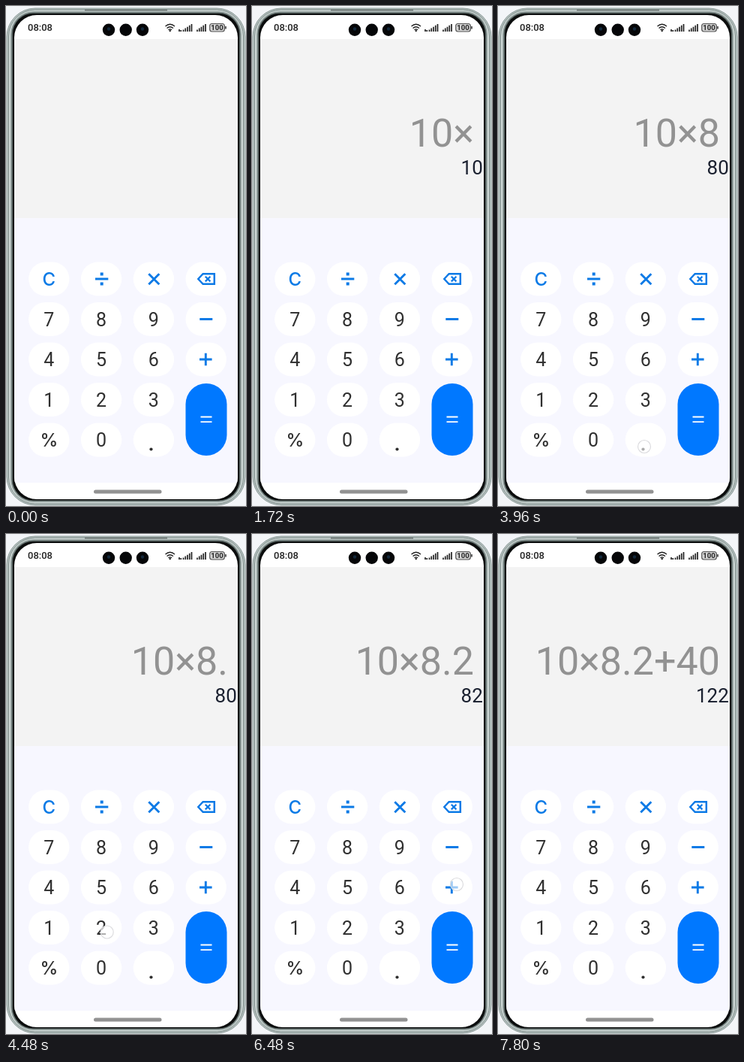
An HTML page that plays this animation: 320 px wide and 665 px high, repeating every 8 s.

```html
<!DOCTYPE html>
<html lang="en">
<head>
<meta charset="utf-8">
<title>Calculator</title>
<style>
  html, body { margin: 0; width: 100%; height: 100%; overflow: hidden; background: #f3f5f8; }
  svg { display: block; width: 320px; height: 665px; font-family: Roboto, "Noto Sans", sans-serif; }
  .line { fill: none; stroke: #0b7ae6; stroke-width: 2.9; }
  .wide { font-family: Inter, sans-serif; font-weight: 500; font-size: 24px; }
  .end { text-anchor: end; }
</style>
</head>
<body>
<svg viewBox="0 0 320 665">
  <defs>
    <clipPath id="screen"><rect x="11" y="12" width="298" height="644" rx="30"/></clipPath>
  </defs>

  <!-- phone body: tighter inner radii make the corners darker than the sides -->
  <rect x="1" y="3" width="318" height="661" rx="38" fill="#b9c5c3" stroke="#8b9997"/>
  <rect x="3.500" y="5" width="313" height="657" rx="35" fill="#cfd9d7" stroke="#7d8a88"/>
  <rect x="6" y="7" width="308" height="653" rx="31" fill="#9aa6a4"/>
  <rect x="7.500" y="8.500" width="305" height="650" rx="29" fill="#566260"/>
  <rect x="9" y="10" width="302" height="647.500" rx="27" fill="#0b0d0d"/>
  <path d="M105 5.500H215" stroke="#59615f" stroke-width="1.600"/>

  <!-- screen -->
  <g clip-path="url(#screen)">
    <path d="M11 12H309V656H11z" fill="#fff"/>
    <path d="M11 44H309V282H11z" fill="#f3f3f3"/>
    <path d="M11 282H309V634H11z" fill="#f7f7ff"/>
  </g>
  <rect x="117" y="643.500" width="90.500" height="5" rx="2.500" fill="#929292"/>

  <!-- status bar -->
  <text x="29" y="33" font-size="13" font-weight="500" fill="#222">08:08</text>
  <g id="cameras"></g>
  <g fill="none" stroke="#222" stroke-width="1.400">
    <path d="M212.500 27Q218.700 21.500 225 27M214.500 29.500Q218.700 25.800 223 29.500M216.500 31.800Q218.700 30 221 31.800"/>
    <rect x="271.700" y="23.500" width="19.600" height="10.500" rx="3" fill="#d2d2d2" stroke="#555" stroke-width="1.200"/>
    <path d="M293 27V30.500"/>
  </g>
  <circle cx="218.700" cy="33" r="1.200" fill="#222"/>
  <path id="bars" stroke="#222" stroke-width="1.700"/>
  <text x="281.500" y="32.300" font-size="9.500" font-weight="700" text-anchor="middle" fill="#222">100</text>

  <!-- keypad -->
  <g id="keys"></g>
  <rect x="239.500" y="502" width="55" height="96" rx="27.500" fill="#0078ff"/>
  <path d="M259.500 546.500H274.500M259.500 553.200H274.500" stroke="#fff" stroke-width="1.800"/>
  <g class="line">
    <path d="M119 363H136.300M190.300 356.300L204.300 370.300M204.300 356.300L190.300 370.300"/>
    <path d="M258.300 416.500H275.300M258 470H274.600M266.300 461.700V478.300"/>
    <path d="M256.300 363L262.600 356.200H277.800V369.800H262.600z" stroke-width="2.500"/>
    <path d="M265.800 359.800L272.400 366.400M272.400 359.800L265.800 366.400" stroke-width="2.300"/>
  </g>
  <path d="M125.700 354.500h4v4h-4zM125.700 367.500h4v4h-4z" fill="#0b7ae6"/>

  <text id="expr" class="end" x="296" y="186.700" font-size="52" fill="#929292"></text>
  <text id="result" class="end" x="307.800" y="223.600" font-size="26" fill="#1b2130"></text>
  <circle id="touch" r="8.500" fill="#fff" fill-opacity=".6" stroke="#dcdcdf" stroke-width="1.200"/>
</svg>
<script>
const $ = id => document.getElementById(id);

$('cameras').innerHTML = [137, 159.7, 182].map((x, i) =>
  `<circle cx="${x}" cy="31.700" r="8.200" fill="#050608"/>` +
  (i === 1 ? '' : `<circle cx="${x}" cy="30.500" r="2.200" fill="#12283a"/>`)).join('');

let bars = 'M231 34v-3M233.200 34v-2';
for (const [x0, n] of [[236.5, 5], [255, 5]])
  for (let i = 0; i < n; i++) bars += `M${x0 + i * 2.75} 34v${-2.5 - i * 1.9}`;
$('bars').setAttribute('d', bars);

// Four columns by five rows; the equals key fills the last column's lower rows.
const labels = ['C   ', '789 ', '456 ', '123', '%0.'];
$('keys').innerHTML = labels.map((row, r) => [...row].map((label, c) => {
  const x = 57.3 + c * 69.8, y = 363 + r * 53.5;
  const color = label === 'C' ? '#0b7ae6' : '#303030';
  const style = 'C%'.includes(label) ? 'wide' : '';
  const face = label === '.'
    ? `<circle cx="193.500" cy="589.500" r="2.100" fill="${color}"/>`
    : `<text class="${style}" x="${x}" y="${y + 9}" font-size="25" text-anchor="middle" fill="${color}">${label}</text>`;
  return `<rect x="${x - 27.2}" y="${y - 22.5}" width="54.400" height="45" rx="22.500" fill="#fff"/>${face}`;
}).join('')).join('');

// start time, expression, running result
const entries = [
  [0, '', ''], [520, '1', '1'], [800, '10', '10'], [1720, '10×', '10'],
  [2760, '10×8', '80'], [4080, '10×8.', '80'], [4640, '10×8.2', '82'],
  [6600, '10×8.2+', '82'], [7400, '10×8.2+4', '86'], [7800, '10×8.2+40', '122']
];
// start, end, x, y
const taps = [
  [400, 520, 73, 520], [1600, 1720, 203, 370], [2640, 2760, 135, 427.5],
  [3960, 4080, 195, 586], [4480, 4640, 134.7, 529.5],
  [6480, 6600, 273, 466], [7640, 7800, 132, 578]
];

const origin = performance.now();
function draw() {
  const t = (performance.now() - origin) % 8000;
  const [, expr, result] = entries.findLast(e => e[0] <= t);
  $('expr').textContent = expr;
  $('result').textContent = result;
  const tap = taps.find(([start, end]) => t >= start && t < end);
  const touch = $('touch');
  touch.style.display = tap ? '' : 'none';
  if (tap) {
    touch.setAttribute('cx', tap[2]);
    touch.setAttribute('cy', tap[3]);
  }
  requestAnimationFrame(draw);
}
draw();
</script>
</body>
</html>
```
